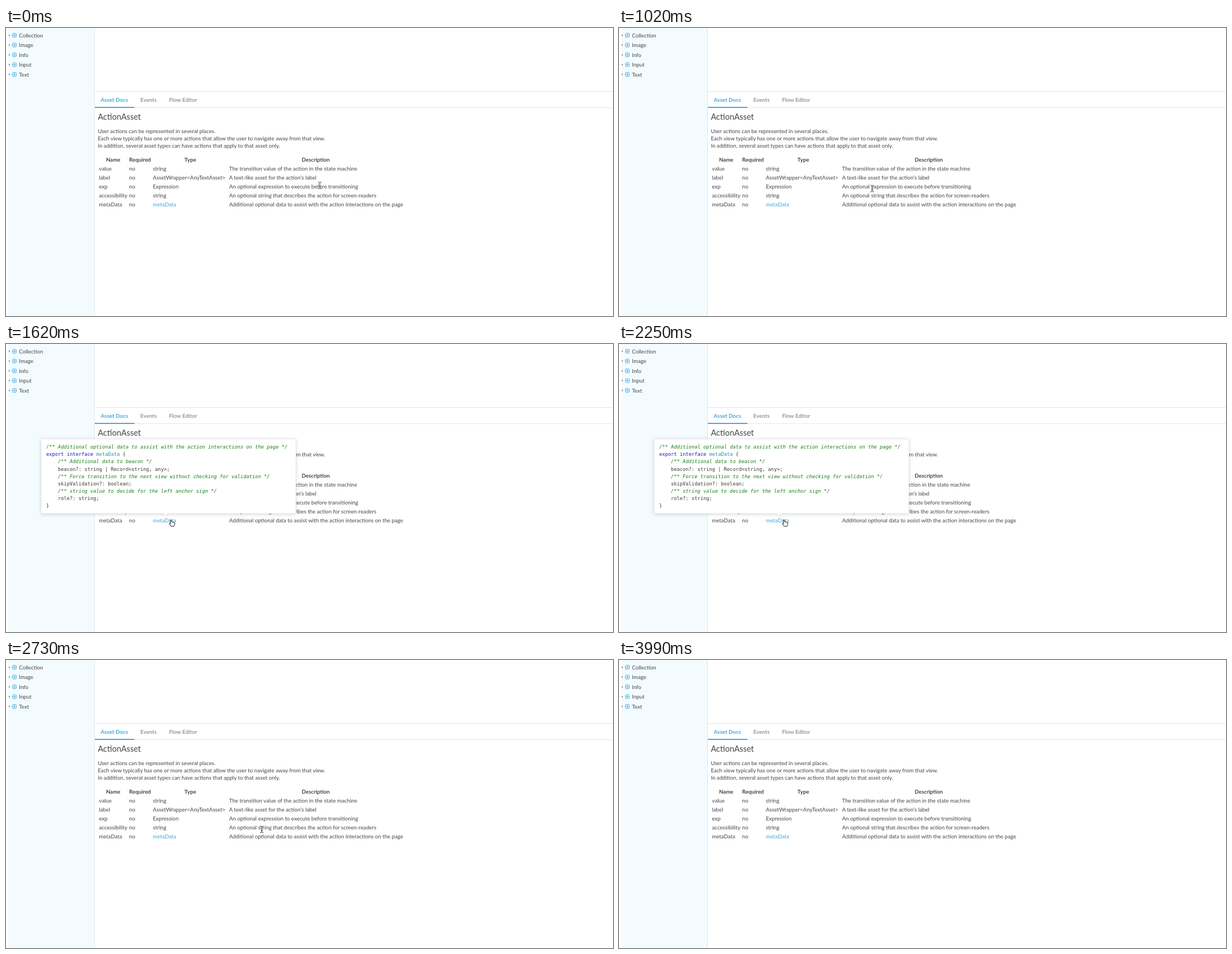
Animation of 1087 by 515 pixels, one loop 4260 ms. Source, as an HTML page:

```html
<!DOCTYPE html>
<html lang="en">
<head>
<meta charset="utf-8">
<title>Asset Docs</title>
<style>
  html, body { margin: 0; width: 100%; height: 100%; overflow: hidden; background: #fff; }
  svg { display: block; width: 1087px; height: 515px; overflow: hidden; }
  text { font: 9.72px Lato, "Open Sans", sans-serif; fill: #434548; white-space: pre; }
  .title { font-size: 14.5px; }
  .tab { font-size: 9.9px; font-weight: 700; fill: #949698; }
  .tab.on, .link { fill: #45a7df; }
  .head { font-weight: 700; text-anchor: middle; }
  .line { fill: #e3e6e8; }
  .icon { fill: #e9f6fd; stroke: #55b0e3; stroke-width: .9; }
  .code text { font: 8.75px "DejaVu Sans Mono", "Liberation Mono", monospace; fill: #393a34; }
  .code .note { fill: #178017; font-style: italic; }
  .key { fill: #1818c8; }
  .type { fill: #2b91af; }

  .popup, .cursor, .shape { animation: 4260ms linear infinite both; }
  .popup { transform-origin: 285px 307px; animation-name: popup; filter: drop-shadow(0 1px 3px rgba(0, 0, 0, .16)); }
  @keyframes popup {
    0%, 33.1% { opacity: 0; transform: scale(.95); animation-timing-function: ease-out; }
    37.32%, 53.52% { opacity: 1; transform: none; }
    56%, 100% { opacity: 0; transform: scale(.95); }
  }

  .cursor { animation-name: move; }
  @keyframes move {
    0%, 1.408% { transform: translate(562px, 281.5px); }
    4.93%, 12.676% { transform: translate(557px, 284px); }
    16.9% { transform: translate(548px, 286px); }
    20.423% { transform: translate(548px, 286px); animation-timing-function: ease-in; }
    23.944% { transform: translate(454px, 287px); }
    27.465% { transform: translate(360px, 303px); animation-timing-function: ease-out; }
    32.394% { transform: translate(297px, 315px); }
    33.8%, 52.817% { transform: translate(295px, 315px); }
    56.338% { transform: translate(308.5px, 309.5px); animation-timing-function: ease-in-out; }
    64.085%, 71.831% { transform: translate(458px, 303px); }
    73.944% { transform: translate(462px, 321px); }
    83.099% { transform: translate(462px, 321px); animation-timing-function: ease-in; }
    86.62% { transform: translate(479px, 391px); }
    90.845%, 100% { transform: translate(492px, 522px); }
  }

  .shape { animation-timing-function: step-end; }
  .beam { animation-name: beam; }
  .hand { animation-name: hand; }
  .arrow { animation-name: arrow; }
  @keyframes beam {
    0% { opacity: 1; } 26.05% { opacity: 0; }
    61.26% { opacity: 1; } 73.22%, 100% { opacity: 0; }
  }
  @keyframes hand {
    0% { opacity: 0; } 30.27% { opacity: 1; } 54.9%, 100% { opacity: 0; }
  }
  @keyframes arrow {
    0% { opacity: 0; } 26.05% { opacity: 1; } 30.27% { opacity: 0; }
    54.9% { opacity: 1; } 61.26% { opacity: 0; } 73.22%, 100% { opacity: 1; }
  }
</style>
</head>
<body>
<svg viewBox="0 0 1087 515">
  <rect x="4" width="154" height="515" fill="#f4fbfe"/>
  <rect class="line" x="158" width="1" height="515"/>
  <rect class="line" x="159" y="113" width="928" height="1"/>
  <rect class="line" x="159" y="142" width="928" height="1"/>
  <rect x="159" y="141" width="71" height="2" fill="#45a7df"/>

  <g id="page">
    <text class="tab on" x="169.5" y="131.5">Asset Docs</text>
    <text class="tab" x="240.5" y="131.5">Events</text>
    <text class="tab" x="292" y="131.5">Flow Editor</text>
    <text class="title" x="164.5" y="164">ActionAsset</text>
    <text x="164.5" y="188">User actions can be represented in several places.</text>
    <text x="164.5" y="201">Each view typically has one or more actions that allow the user to navigate away from that view.</text>
    <text x="164.5" y="214">In addition, several asset types can have actions that apply to that asset only.</text>
    <text class="head" x="192" y="239">Name</text>
    <text class="head" x="240" y="239">Required</text>
    <text class="head" x="330" y="239">Type</text>
    <text class="head" x="554.7" y="239">Description</text>
  </g>

  <g class="popup">
    <rect x="63" y="170" width="456" height="133" rx="2" fill="#fff" stroke="#e4e7ea" stroke-width=".7"/>
    <path d="M280.5 302h9l-4.5 4.5z" fill="#fff"/>
    <g class="code">
      <text class="note" x="72" y="187">/** Additional optional data to assist with the action interactions on the page */</text>
      <text x="72" y="200"><tspan class="key">export interface</tspan> <tspan class="type">metaData</tspan> {</text>
      <text class="note" x="93" y="213">/** Additional data to beacon */</text>
      <text x="93" y="226.5">beacon?: string | Record&lt;string, any&gt;;</text>
      <text class="note" x="93" y="239.5">/** Force transition to the next view without checking for validation */</text>
      <text x="93" y="252.5">skipValidation?: boolean;</text>
      <text class="note" x="93" y="266">/** string value to decide for the left anchor sign */</text>
      <text x="93" y="279">role?: string;</text>
      <text x="72" y="292">}</text>
    </g>
  </g>

  <g class="cursor">
    <g class="shape beam" fill="none">
      <path d="M-3-6q2.5 0 3 1.5q.5-1.5 3-1.5M-3 6q2.5 0 3-1.5q.5 1.5 3 1.5M0-4.5v9M-1.5 2h3" stroke="#fff" stroke-width="2.2"/>
      <path d="M-3-6q2.5 0 3 1.5q.5-1.5 3-1.5M-3 6q2.5 0 3-1.5q.5 1.5 3 1.5M0-4.5v9M-1.5 2h3" stroke="#222" stroke-width="1"/>
    </g>
    <path class="shape hand" d="M-1 0q1-1.3 2 0l1 3.3q1-.9 1.8.3q1.2-.7 1.8.5q1.3-.3 1.5 1l-.3 3.3l-1.2 2.6h-5l-2.8-3.8q-.8-1.5.6-1.5l1.5 1z" fill="#fff" stroke="#111" stroke-width="1" stroke-linejoin="round"/>
    <path class="shape arrow" d="M0 0v10.5l2.4-2.2l1.7 3.9l1.8-.8l-1.7-3.8h3.2z" fill="#000" stroke="#fff" stroke-width=".8" paint-order="stroke"/>
  </g>
</svg>
<script>
  const page = document.getElementById("page");

  function add(tag, attrs, label = "") {
    const el = document.createElementNS("http://www.w3.org/2000/svg", tag);
    for (const name in attrs) el.setAttribute(name, attrs[name]);
    el.textContent = label;
    page.append(el);
  }

  ["Collection", "Image", "Info", "Input", "Text"].forEach((name, i) => {
    const y = 13 + 17.5 * i;
    add("path", { d: `M5 ${y - 2}l2.5 2l-2.5 2z`, fill: "#8d9498" });
    add("rect", { class: "icon", x: 11.5, y: y - 3.5, width: 7, height: 7, rx: 1.4 });
    add("path", { class: "icon", d: `M15 ${y - 3.5}v7M11.5 ${y}h7` });
    add("text", { x: 23.3, y: y + 3.5 }, name);
  });

  [
    ["value", "string", "The transition value of the action in the state machine"],
    ["label", "AssetWrapper<AnyTextAsset>", "A text-like asset for the action's label"],
    ["exp", "Expression", "An optional expression to execute before transitioning"],
    ["accessibility", "string", "An optional string that describes the action for screen-readers"],
    ["metaData", "metaData", "Additional optional data to assist with the action interactions on the page"]
  ].forEach(([name, type, info], i) => {
    const y = 255 + 16 * i;
    add("text", { x: 166.5, y }, name);
    add("text", { x: 220.5, y }, "no");
    add("text", { x: 263, y, class: type === "metaData" ? "link" : "" }, type);
    add("text", { x: 399.5, y }, info);
  });
</script>
</body>
</html>
```
